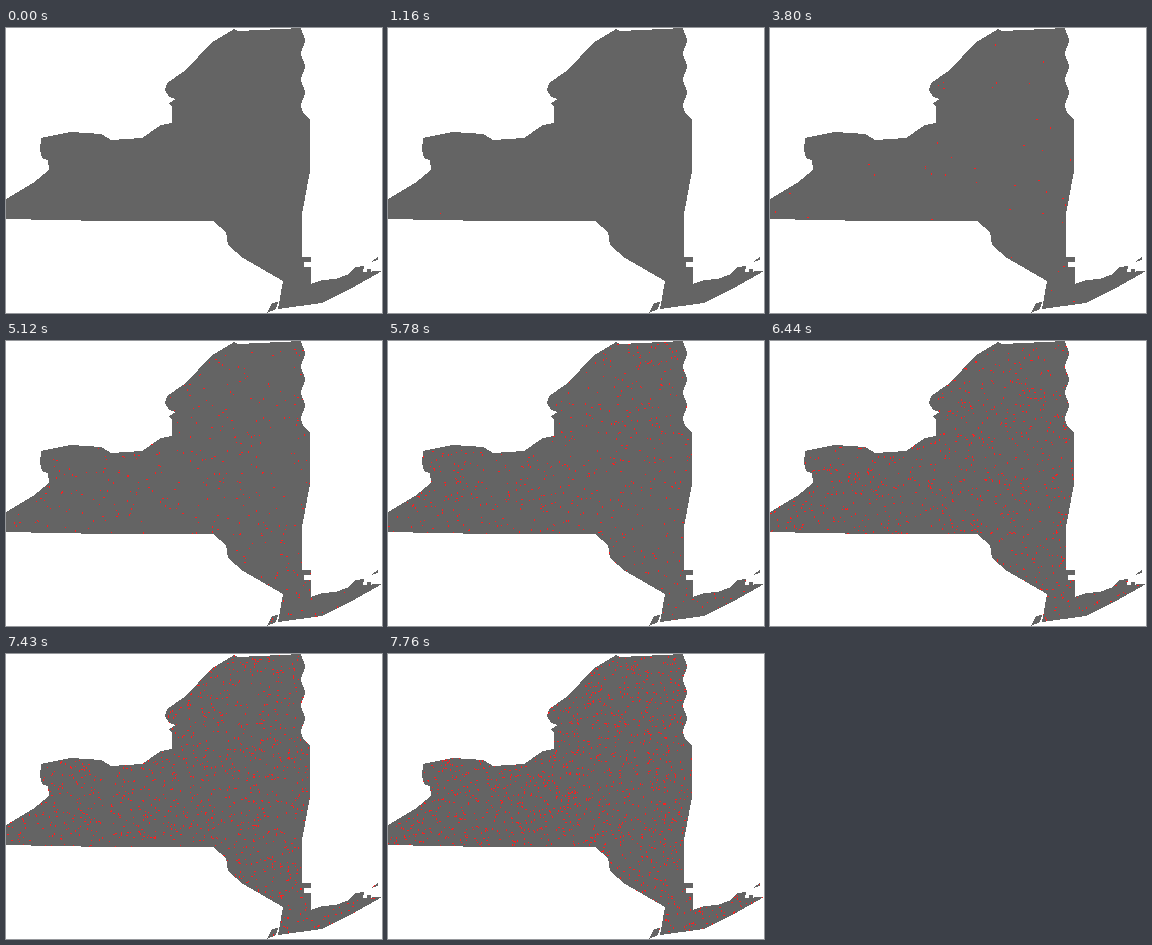
Recreate the animation shown at these times as a matplotlib script. Size 376 px wide and 285 px high, loop 8 s.

```python
import numpy as np
import matplotlib.pyplot as plt
from matplotlib.animation import FuncAnimation
from matplotlib.path import Path

W, H, DPI = 376, 285, 64
LOOP_MS, TICK_MS = 8000, 20
FIRST_MS, STEP_MS = 500, 330
LAND, RED = (100, 100, 100), (255, 30, 30)

# The state's outline, clockwise, as a few key points per side.
NORTH = [(163, 69), (159, 62), (161, 55), (180, 42), (205, 15), (228, 1),
         (232, 3)]
SOUTHEAST = [(298, 86), (304, 91), (304, 143), (296, 186), (296, 229),
             (305, 229), (305, 234), (298, 234), (298, 239), (305, 239),
             (305, 256), (316, 252), (330, 251), (343, 246), (350, 239),
             (358, 238), (357, 244), (376, 243), (346, 260), (316, 275),
             (272, 281), (277, 253)]
SOUTHWEST = [(237, 230), (222, 217), (220, 204), (207, 193), (100, 193),
             (0, 191), (0, 171), (27, 155), (43, 142), (42, 132), (36, 130),
             (34, 122), (35, 110), (65, 104), (95, 106), (105, 112),
             (136, 110), (155, 97), (166, 95), (166, 78), (163, 75),
             (170, 71)]
ISLETS = [[(261, 285), (266, 275), (272, 274), (270, 281)],
          [(365, 234), (372, 229), (372, 232)],
          [(361, 241), (365, 241), (365, 245), (361, 245)]]


def land_mask():
    y = np.arange(0, 86, 3)
    east = np.column_stack([297 + 2 * np.sin(2 * np.pi * (y - 6) / 26), y])
    mainland = np.vstack([NORTH, east, SOUTHEAST, SOUTHWEST])
    ys, xs = np.mgrid[:H, :W]
    centers = np.column_stack([xs.ravel() + 0.5, ys.ravel() + 0.5])
    mask = np.zeros(W * H, bool)
    for outline in [mainland] + ISLETS:
        mask |= Path(np.vstack([outline, outline[:1]])).contains_points(centers)
    return mask.reshape(H, W)


MASK = land_mask()
LAND_YX = np.argwhere(MASK)


def dot_count(step):
    """Slow geometric start, then a steep power-law rise."""
    return int(1.3 ** min(step, 10) - 0.2 + 27 * max(step - 10, 0) ** 1.51)


def render(step):
    """The land with a fresh scatter of one- and two-pixel dots."""
    image = np.full((H, W, 3), 255, np.uint8)
    image[MASK] = LAND
    rng = np.random.default_rng(step)
    dots = rng.choice(LAND_YX, dot_count(step), replace=False)
    paired = dots[rng.random(len(dots)) < min(0.55, step / 20)]
    down = rng.integers(0, 2, len(paired))
    second = paired + np.column_stack([down, 1 - down])
    for y, x in np.vstack([dots, second]):
        if y < H and x < W and MASK[y, x]:
            image[y, x] = RED
    return image


def step_at(ms):
    return 0 if ms < FIRST_MS else 1 + (ms - FIRST_MS) // STEP_MS


STEPS = [render(s) for s in range(step_at(LOOP_MS - 1) + 1)]

fig = plt.figure(figsize=(W / DPI, H / DPI), dpi=DPI, facecolor="white")
ax = fig.add_axes([0, 0, 1, 1])
ax.axis("off")
picture = ax.imshow(STEPS[0], interpolation="nearest", aspect="auto",
                    extent=(0, W, H, 0))


def update(frame):
    picture.set_data(STEPS[step_at(frame * TICK_MS)])
    return [picture]


anim = FuncAnimation(fig, update, frames=LOOP_MS // TICK_MS,
                     interval=TICK_MS, repeat=True, repeat_delay=0)
plt.show()
```
